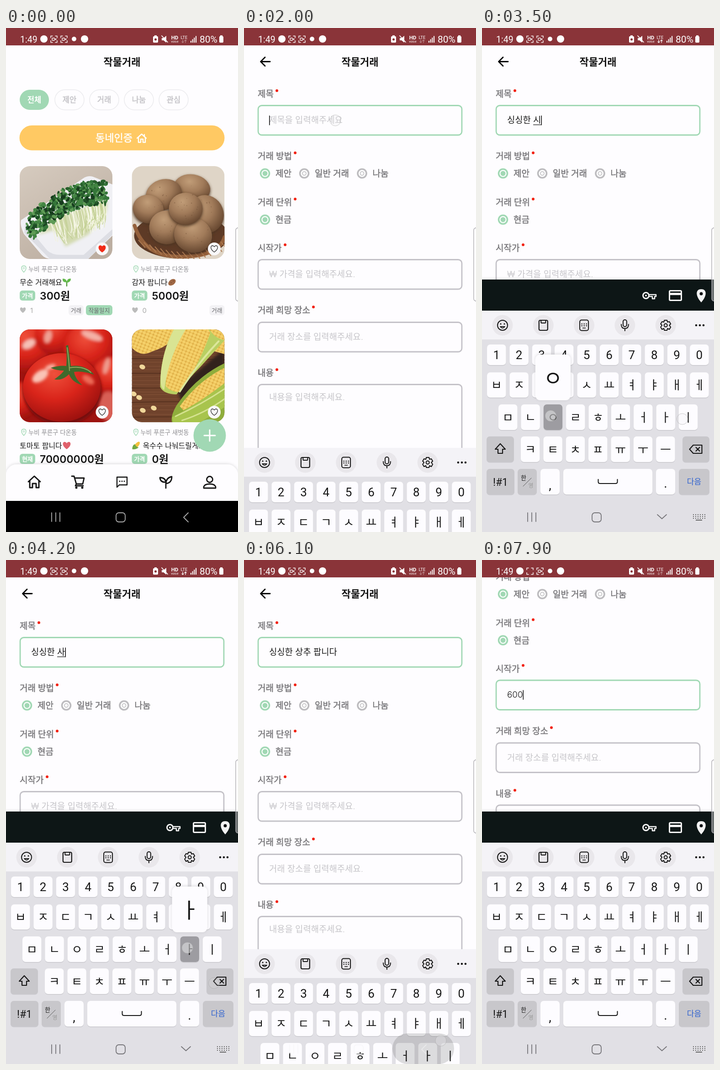
Recreate the animation shown at these times as an HTML page. Size 508 by 1102 pixels, loop 8000 ms.

```html
<!DOCTYPE html>
<html lang="ko">
<head>
<meta charset="utf-8">
<style>
html, body { margin: 0; width: 100%; height: 100%; overflow: hidden; background: #fefdff; }
svg { display: block; width: 100vw; height: 100vh; }
text { font-family: Inter, "Noto Sans CJK KR", "Noto Sans CJK", sans-serif; white-space: pre; }
.latin { font-family: Roboto, sans-serif; }
.price { font-weight: 600; }
.mid { font-weight: 500; stroke-width: .55px; }
.bold { font-weight: 700; }
.light { font-weight: 300; }
.c { text-anchor: middle; }
.line { fill: none; stroke-linecap: round; stroke-linejoin: round; }
</style>
</head>
<body>
<svg id="stage" viewBox="0 0 508 1102" preserveAspectRatio="none"></svg>
<script>
const GREEN = '#a1d8b4', GREY = '#c4c2c8', INK = '#161616';
const HEART = 'M0 7C-10 0-8-7-4-7C-1.5-7 0-5 0-4C0-5 1.5-7 4-7C8-7 10 0 0 7Z';

let seed = 7;
const rand = (a, b) => a + (b - a) * ((seed = seed * 16807 % 2147483647) / 2147483647);
const pick = list => list[rand(0, list.length) | 0];
const repeat = (n, f) => Array.from({ length: n }, (_, i) => f(i)).join('');
const text = (x, y, s, size, fill = INK, cls = '') =>
  `<text x="${x}" y="${y + size * .37}" font-size="${size}" fill="${fill}" class="${cls}"${cls.includes('mid') ? ` stroke="${fill}"` : ''}>${s}</text>`;
const rect = (x, y, w, h, r, fill, more = '') =>
  `<rect x="${x}" y="${y}" width="${w}" height="${h}" rx="${r}" fill="${fill}" ${more}/>`;
const disc = (x, y, r, fill, more = '') => `<circle cx="${x}" cy="${y}" r="${r}" fill="${fill}" ${more}/>`;
const oval = (x, y, rx, ry, fill, turn = 0, more = '') =>
  `<ellipse rx="${rx}" ry="${ry}" fill="${fill}" transform="translate(${x} ${y}) rotate(${turn})" ${more}/>`;
const path = (d, fill, more = '') => `<path d="${d}" fill="${fill}" ${more}/>`;
const line = (d, color, w = 2, more = '') => `<path class="line" d="${d}" stroke="${color}" stroke-width="${w}" ${more}/>`;
const at = (x, y, s) => `<g transform="translate(${x} ${y})">${s}</g>`;
const pin = (x, y) => at(x, y, line('M0 7C-7 0-6-7 0-7C6-7 7 0 0 7Z', GREEN, 1.5) + disc(0, -2, 1.8, 'none', `stroke="${GREEN}"`));
const SOFT = 'filter="url(#soft)"';

// Produce pictures, 203 px square
const sprouts = () => rect(0, 0, 203, 203, 0, 'url(#cloth)') +
  path('M3 118Q0 128 9 148L48 194Q56 203 70 203H150L203 152V40L160 23Q150 20 140 26Z', '#f0f0f4') +
  path('M12 126L60 184Q70 194 90 194H140L203 138V150L150 203H66L10 146Z', '#dddee4') +
  path('M40 150L75 115L190 72Q196 105 172 122L150 150L100 176Q90 150 74 140Z', '#d3dab0', SOFT) +
  repeat(110, () => {
    const k = rand(0, 1), x = 66 + k * 122, y = 116 - k * 38;
    return line(`M${x} ${y}Q${x + 8} ${y + 30} ${x + rand(10, 32) - k * 26} ${y + rand(38, 62) - k * 8}`,
      pick(['#f2f3dd', '#e6ebc6', '#c3d094', '#fafaf0']), 1.6);
  }) +
  repeat(480, () => {
    const k = rand(0, 1), x = 20 + k * 170 + rand(-8, 8), y = 136 - k * 78 - 22 * Math.sin(k * 3.1) + rand(-26, 26);
    return oval(x, y, rand(3, 6.5), rand(2, 4.5), pick(['#285f2c', '#35763a', '#438543', '#1d4b25', '#173c1e', '#5f9b56']), rand(0, 180));
  });

const potatoes = () => rect(0, 0, 203, 203, 0, '#dfd5c7') + oval(108, 152, 103, 50, '#5d3a26') +
  line('M6 130Q28 200 110 198Q190 198 203 155', '#94603b', 8) +
  repeat(16, i => line(`M${15 + i * 12} ${162 + 26 * Math.sin(i / 5)}l14 16`, '#ac7950', 2)) +
  [[132, 48, 40, 30, 10], [70, 62, 40, 33, -18], [36, 94, 34, 31, 20], [162, 105, 39, 42, -20],
   [76, 134, 38, 37, 5], [134, 151, 42, 38, 18], [118, 93, 37, 35, 0]]
    .map(p => oval(p[0], p[1] + 3, p[2], p[3], '#4e3424', p[4], SOFT) + oval(...p.slice(0, 4), 'url(#potato)', p[4])).join('') +
  repeat(60, () => disc(rand(35, 175), rand(40, 165), rand(.5, 1.3), '#76543b', 'opacity=".5"'));

const tomato = () => rect(0, 0, 203, 203, 0, '#9d1310') +
  `<g ${SOFT}>` + [[22, 38, 56], [78, 12, 45], [155, 42, 58], [203, 105, 45], [0, 155, 40]].map(p => disc(...p, 'url(#tomato)')).join('') +
  oval(20, 32, 15, 9, '#f6c0b5', -30) + oval(62, 16, 8, 14, '#f0a093', 15) + oval(158, 14, 24, 8, '#f4b1a6', 20) +
  oval(190, 80, 6, 18, '#ef9c8e', 15) + oval(194, 168, 22, 32, '#d85e54') + '</g>' +
  oval(93, 132, 86, 78, '#750b09', 0, SOFT) + oval(92, 127, 85, 75, 'url(#tomato)') +
  `<g ${SOFT}>` + oval(45, 102, 20, 11, '#fac3b6', -35) + oval(67, 82, 12, 5, '#f9b3a5', -20) + oval(150, 110, 15, 8, '#ed6a56', 35) + '</g>' +
  path('M102 80Q104 54 101 36L106 34Q110 62 112 80Q144 76 163 99Q137 90 119 93Q121 107 137 122Q114 115 108 98Q93 113 76 109Q92 98 97 90Q80 90 68 84Q88 78 102 80Z', '#3f6a2c') +
  line('M104 40Q108 70 109 90M109 84Q140 79 156 94', '#91a65f', 2);

const corn = () => rect(0, 0, 203, 203, 0, '#70432c') +
  repeat(26, i => line(`M0 ${i * 8}q60 ${rand(-5, 5)} 203 ${rand(-3, 3)}`, i % 4 ? '#805036' : '#4c2a1a', 1.3)) +
  path('M98 130L203 42V110L112 166Z', '#30201a', SOFT) +
  path('M0 0H105Q90 34 45 48Q20 62 0 40Z', 'url(#kernels)') +
  path('M168 0H203V54L160 42Z', 'url(#kernels)') +
  path('M92 0Q62 55 62 126Q70 142 98 142Q122 110 150 82L203 24Q180 18 170 0Z', '#b9cf62') +
  path('M108 0Q76 62 74 124Q84 136 102 137Q142 91 172 8L168 0Z', 'url(#kernels)') +
  path('M92 0H118Q80 62 71 132Q60 128 64 91Q70 42 92 0Z', '#d9e493') + line('M190 26Q146 72 105 136', '#dce69b', 4) +
  path('M98 166Q140 104 203 74V203H88Q84 190 98 166Z', '#8fad3c') +
  path('M105 168Q146 112 203 84V118Q154 156 113 177Z', 'url(#kernels)') +
  path('M88 192Q140 166 203 118V170L150 203H90Z', '#a8c44d') + line('M96 190Q154 163 203 130M110 199Q160 183 203 152', '#d5e290', 3) +
  [[23, 82], [16, 149], [24, 177], [48, 172], [4, 141]].map(p => oval(...p, 6.5, 5, '#f0d79a', 20)).join('');

const EMOJI = {
  sprout: line('M0 8V-1', '#539b3d', 2.5) + path('M0 0Q-10 1-9-8Q0-8 0 0ZM0 1Q9 0 9-8Q0-9 0 1Z', '#63b84b'),
  potato: oval(0, 0, 9, 6, '#a06845', -35) + disc(-2, 1, 1, '#6e432c') + disc(3, -3, 1, '#6e432c'),
  heart: path(HEART, '#e0616c', 'transform="scale(1.15)"'),
  corn: oval(1, -1, 4, 9, '#f5c13f', 40) + path('M-9 8Q-9-2-3-3Q-1 3 5 4Q0 9-9 8Z', '#71a943'),
};

function card(x, y, picture, town, title, emoji, ex, label, price, likes, tags) {
  const liked = likes > 0;
  return at(x, y, `<g clip-path="url(#photo)">${picture()}</g>`) +
    disc(x + 180.5, y + 181, 14, '#f9f8fa') +
    at(x + 180.5, y + 181, path(HEART, liked ? '#f12b18' : 'none', `stroke="${liked ? '#f12b18' : '#333'}" stroke-width="1.3"`)) +
    pin(x + 9, y + 225) + text(x + 19, y + 225, town, 13.4, '#8d8c90') +
    text(x + (emoji === 'corn' ? 24 : 0), y + 254, title, 16) + at(x + ex, y + 254, EMOJI[emoji]) +
    rect(x, y + 272, 34, 22, 6, GREEN) + text(x + 17, y + 283, label, 13, '#fff', 'mid c') +
    text(x + 44, y + 283, price, 23, INK, 'price') +
    at(x + 7, y + 315, path(HEART, '#bbb', 'transform="scale(.85)"')) + text(x + 23, y + 315, likes, 15, '#aaa') +
    tags.map(([s, tx, w, bg]) => rect(x + tx, y + 304, w, 22, 6, bg) + text(x + tx + w / 2, y + 315, s, 12.7, '#68686c', 'c')).join('');
}

const ICON = {
  home: line('M-13-1L0-13L13-1M-10-3V12H-4V3H4V12H10V-3', INK, 3),
  cart: line('M-14-13H-9L-4 4H10L13-9H-8M-4 4L-6 8H11', INK, 2.8) + disc(-4, 12, 2.5, INK) + disc(9, 12, 2.5, INK),
  chat: line('M-11 11V-11H11V6H-6Z', INK, 2.4) + [-5, 0, 5].map(x => disc(x, -2, 1.5, INK)).join(''),
  leaf: line('M0 13V-1M0 0Q-12 1-13-10Q-1-10 0 0M0 3Q1-10 13-12Q13 2 0 3', INK, 2.8),
  user: disc(0, -6, 6.5, 'none', `stroke="${INK}" stroke-width="2.8"`) + line('M-13 13V10Q-11 4 0 4Q11 4 13 10V13Z', INK, 2.8),
};

const navIcons = (color, down) =>
  line('M100 1060v19M109 1060v19M118 1060v19', color, 1.8) +
  rect(241, 1060, 20, 20, 6, 'none', `stroke="${color}" stroke-width="1.8"`) +
  line(down ? 'M384 1064l10 9l10-9' : 'M399 1060l-10 10l10 10', color, 1.8);

function listPage() {
  const chips = ['전체', '제안', '거래', '나눔', '관심'], deal = ['거래', 107, 33, '#f3f2f5'];
  const place = '누비 푸른구 ';
  return rect(0, 38, 508, 1000, 0, '#fefdff') + text(254, 74, '작물거래', 22, INK, 'bold c') +
    chips.map((s, i) => {
      const x = i ? 31 + i * 76 : 30;
      return rect(x, 135, 64, 44, 22, i ? '#fefdff' : GREEN, i ? 'stroke="#ebebee" stroke-width="1.5"' : '') +
        text(x + 32, 157, s, 16.5, i ? '#c4c3c7' : '#fff', i ? 'mid c' : 'bold c');
    }).join('') +
    rect(29.5, 213, 449, 54.5, 27, '#ffc963') + text(196, 240, '동네인증', 22, '#fff', 'mid') +
    at(297, 241, line('M-10 0L0-9L10 0M-7-2V9H-2V2H3V9H8V-2M6-8V-5', '#fff', 2.4)) +
    card(30, 302, sprouts, place + '다온동', '무순 거래해요', 'sprout', 103, '가격', '300원', 1, [deal, ['작물일지', 145, 58, GREEN]]) +
    card(275.5, 302, potatoes, place + '다온동', '감자 팝니다', 'potato', 88, '가격', '5000원', 0, [['거래', 170, 33, '#f3f2f5']]) +
    card(30, 659, tomato, place + '다온동', '토마토 팝니다', 'heart', 103, '현재', '70000000원', 0, []) +
    card(275.5, 659, corn, place + '새벗동', '옥수수 나눠드릴게요', 'corn', 10, '가격', '0원', 0, []) +
    disc(446, 891, 35.5, GREEN) + line('M434 891h24M446 879v24', '#fff', 3) +
    rect(0, 954, 508, 110, 24, '#fefdff', 'filter="url(#shade)"') +
    Object.values(ICON).map((s, i) => at(62 + i * 96, 993, s)).join('');
}

const field = (id, y, h, hint) => rect(31, y + 1.5, 446, h - 2.5, 8, '#fefdff', `id="${id}" stroke="${GREY}" stroke-width="2.8"`) +
  (hint ? text(55, y + (h > 80 ? 29 : 33.5), hint, 18.8, '#c6c5c9', 'light') : '');
const label = (y, s, dot) => text(30, y, s, 19, '#7b7a7d', 'mid') + disc(dot, y - 7, 3, '#f22313');
const radio = (x, y, s, on, id = '') => `<g id="${id}">${radioMark(x, y, on)}</g>` + text(x + 23, y, s, 19, '#79787b', 'mid');
const radioMark = (x, y, on) => disc(x, y, 9.5, '#fff', `stroke="${on ? GREEN : '#bdbcbf'}" stroke-width="3.6"`) +
  disc(x, y, on ? 5.5 : 4, on ? GREEN : 'none', on ? '' : 'stroke="#bdbcbf" stroke-width="1.6"');

const formPage = () => rect(0, 38, 508, 1000, 0, '#fefdff') +
  `<g clip-path="url(#body)"><g id="scroll">` +
  line('M57 73.5H37M46 64L36.5 73.5L46 83', '#000', 2.8) + text(254, 74, '작물거래', 22, INK, 'bold c') +
  label(144, '제목', 72) + field('titleBox', 168, 67, '') + '<g id="titleText"></g>' +
  label(280, '거래 방법', 112) + radio(46, 318, '제안', false, 'offer') + radio(132, 318, '일반 거래') + radio(258.5, 318, '나눔') +
  label(381, '거래 단위', 112) + radio(46, 419, '현금', true) +
  label(481, '시작가', 90) + field('priceBox', 505, 67, '') + '<g id="priceText"></g>' +
  label(617, '거래 희망 장소', 152) + field('placeBox', 642, 67, '거래 장소를 입력해주세요.') +
  label(754, '내용', 72) + field('bodyBox', 778, 190, '내용을 입력해주세요.') + '</g></g>' +
  rect(30, 941, 448, 70, 10, GREEN) + text(254, 976.5, '등록하기', 22, '#fff', 'mid c');

// Keyboard
const keys = [];
[['1234567890', 11, 692, 45], ['ㅂㅈㄷㄱㅅㅛㅕㅑㅐㅔ', 11, 753, 55], ['ㅁㄴㅇㄹㅎㅗㅓㅏㅣ', 36, 823, 56], ['ㅋㅌㅊㅍㅠㅜㅡ', 85, 893, 56]]
  .forEach(([row, x, y, h]) => [...row].forEach((c, i) => keys.push({ c, x: x + i * 49.35, y, w: 41.5, h })));
[['⇧', 10, 893, 60, 1], ['⌫', 439, 893, 59, 1], ['!#1', 10, 964, 61, 1], ['한', 78, 964, 42, 1],
 [',', 128, 964, 42], [' ', 178, 964, 195], ['.', 381, 964, 42], ['다음', 431, 964, 67, 1]]
  .forEach(([c, x, y, w, dark]) => keys.push({ c, x, y, w, h: 56, dark }));

const special = {
  '⇧': line('M0-12L11 0H5V9H-5V0H-11Z', INK, 2.2),
  '⌫': line('M-14 0L-6-9H13V9H-6ZM0-4L8 4M8-4L0 4', INK, 2.2),
  '한': text(-8, -9, '한', 13, INK, 'c') + line('M-9 10L9-8', '#555', 1) + text(8, 9, '영', 12, '#999', 'c'),
  ' ': line('M-21-5V0Q-21 4-17 4H17Q21 4 21 0V-5', INK, 2),
  ',': text(0, 7, ',', 28, INK, 'latin c'),
  '.': text(0, 3, '.', 28, INK, 'latin c'),
  '!#1': text(0, 0, '!#1', 23, INK, 'latin c'),
  '다음': text(0, 0, '다음', 17, '#2f62cf', 'c'),
};
const glyph = (c, size) => special[c] || text(0, 0, c, size, INK, /\d/.test(c) ? 'latin c' : 'c');
const keyCap = (k, fill) => rect(k.x, k.y, k.w, k.h, 7, fill || (k.dark ? '#c8c7cb' : '#fdfcff')) +
  at(k.x + k.w / 2, k.y + k.h / 2, glyph(k.c, 26));

const toolIcons = [
  disc(0, 0, 11, 'none', `stroke="${INK}" stroke-width="2"`) + disc(-4, -3, 1.6, INK) + disc(4, -3, 1.6, INK) + line('M-5 3Q0 9 5 3Z', INK, 1.8),
  rect(-9.5, -11, 19, 22, 3, 'none', `stroke="${INK}" stroke-width="2.2"`) + rect(-5, -11, 10, 6, 1, 'none', `stroke="${INK}" stroke-width="2"`),
  rect(-9.5, -11.5, 19, 23, 4, 'none', `stroke="${INK}" stroke-width="2"`) + repeat(6, i => rect(-6 + i % 3 * 5, -4 + (i / 3 | 0) * 4, 2.2, 2.2, 0, INK)) + line('M-3 6H3', INK, 1.6),
  rect(-4, -12, 8, 15, 4, 'none', `stroke="${INK}" stroke-width="2"`) + line('M-8-2Q-8 7 0 7Q8 7 8-2M0 7V12', INK, 2),
  line('M-3-11H3L4-7L8-8L11-3L8 0L11 4L8 9L4 7L3 11H-3L-4 7L-8 9L-11 4L-8 0L-11-3L-8-8L-4-7Z', INK, 2) + disc(0, 0, 3.5, 'none', `stroke="${INK}" stroke-width="2"`),
];
const keyboard = () => rect(0, 618, 508, 500, 0, '#e1e0e5') + rect(0, 618, 508, 63, 0, '#f4f3f7') +
  toolIcons.map((s, i) => disc(45 + i * 89.3, 650, 22.5, '#e9e7eb') + at(45 + i * 89.3, 650, s)).join('') +
  [469, 477, 485].map(x => disc(x, 650, 2.3, INK)).join('') +
  keys.map(k => rect(k.x, k.y + 1.5, k.w, k.h, 7, '#cac9ce') + keyCap(k)).join('') + navIcons('#77767a', true) +
  repeat(18, i => rect(462 + i % 6 * 5, 1063 + (i / 6 | 0) * 4, 2, 2, 0, '#666')) + rect(468, 1075, 14, 2, 0, '#666');

const autofill = () => rect(0, 550, 508, 68.5, 0, '#101214', 'filter="url(#shade)"') +
  disc(359, 585, 6.5, 'none', 'stroke="#f3f3f3" stroke-width="3"') + disc(359, 585, 2, '#f3f3f3') +
  line('M367 583H381V587H378V592H373V587H367', '#f3f3f3', 2.5) +
  rect(410.5, 574.5, 26, 21, 2, 'none', 'stroke="#f3f3f3" stroke-width="3"') + rect(410, 579, 27, 5, 0, '#f3f3f3') +
  path('M480 600C466 584 468 571 480 571C492 571 494 584 480 600Z', '#f3f3f3') + disc(480, 581, 3.5, '#101214');

const camera = (x, id) => at(x, 24.5, line('M-7-3V-7H-3M3-7H7V-3M7 3V7H3M-3 7H-7V3', '#fff', 1.4) +
  `<g id="${id}">${rect(-4, -2.5, 5.5, 5, 1, 'none', 'stroke="#fff" stroke-width="1.3"')}${path('M2 0L5-2.5V2.5Z', '#fff')}</g>`);
const statusBar = () => rect(0, 0, 508, 38, 0, '#8a3439') + text(31, 24.5, '1:49', 19.5, '#fff', 'latin') +
  disc(83, 24, 8, '#fff') + camera(105, 'rec') + camera(127, '') + disc(149, 24, 5, '#fff') + disc(172, 24, 8, '#fff') +
  rect(322, 18, 11, 14, 2, '#fff') + rect(325, 16, 5, 3, 0, '#fff') + disc(327.5, 25, 2.5, '#8a3439') +
  path('M341 22h4l6-5v15l-6-5h-4Z', '#fff') + line('M341 17L354 31', '#fff', 1.8) +
  text(369.5, 21, 'HD', 11.5, '#fff', 'latin bold c') + text(369.5, 29, 'voice', 7, '#fff', 'latin c') +
  text(390, 20, 'LTE', 9.5, '#fff', 'latin c') +
  line('M387 26V32l-2-2M387 32l2-2M393 32V26l-2 2M393 26l2 2', '#fff', 1.3, 'id="data"') +
  repeat(4, i => rect(404 + i * 3.7, 28 - i * 3.5, 2, 4 + i * 3.5, 0, '#fff')) +
  text(424, 24.5, '80%', 21, '#fff', 'latin') + rect(467, 18, 9, 14, 2, '#fff') + rect(469, 16, 5, 3, 0, '#fff');

const stage = document.getElementById('stage');
stage.innerHTML = `<defs>
<clipPath id="photo"><rect width="203" height="203" rx="22"/></clipPath>
<clipPath id="body"><rect y="38" width="508" height="880"/></clipPath>
<linearGradient id="cloth" x2=".6" y2="1"><stop stop-color="#d6cbbf"/><stop offset="1" stop-color="#bcaea1"/></linearGradient>
<radialGradient id="potato" cx=".4" cy=".28" r=".75"><stop stop-color="#c19d78"/><stop offset=".5" stop-color="#a17b5a"/><stop offset="1" stop-color="#65462f"/></radialGradient>
<radialGradient id="tomato" cx=".4" cy=".3" r=".75"><stop stop-color="#ef503b"/><stop offset=".5" stop-color="#d9241a"/><stop offset="1" stop-color="#970f0d"/></radialGradient>
<pattern id="kernels" width="8" height="7" patternUnits="userSpaceOnUse" patternTransform="rotate(22)"><rect width="8" height="7" fill="#dfae45"/><ellipse cx="4" cy="3.5" rx="3.7" ry="3.2" fill="#f5d069"/></pattern>
<filter id="soft"><feGaussianBlur stdDeviation="3"/></filter>
<filter id="shade" x="-10%" y="-20%" width="120%" height="140%"><feDropShadow dx="0" dy="-1" stdDeviation="3" flood-opacity=".14"/></filter>
</defs>
<g id="list">${listPage()}</g><g id="form">${formPage()}</g>
${rect(0, 1034, 508, 68, 0, '#000')}${navIcons('#aaa', false)}
<g id="fill">${autofill()}</g><g id="board">${keyboard()}</g><g id="over"></g>
${rect(503, 437, 20, 160, 5, 'rgba(255,255,255,.4)', 'stroke="#a9a8ad" stroke-width="1.3"')}${statusBar()}`;
const $ = id => document.getElementById(id);

// [time, key, text after the press]
const typing = [
  [2300, 'ㅅ', 'ㅅ'], [2500, 'ㅣ', '시'], [2600, 'ㅇ', '싱'], [2700, 'ㅅ', '싱ㅅ'], [2800, 'ㅣ', '싱시'], [2900, 'ㅇ', '싱싱'],
  [3000, 'ㅎ', '싱싱ㅎ'], [3100, 'ㄴ', '싱싱한'], [3200, ' ', '싱싱한 '], [3300, 'ㅅ', '싱싱한 ㅅ'], [3400, 'ㅣ', '싱싱한 시'],
  [3500, 'ㅇ', '싱싱한 시'], [3600, '', '싱싱한 싱'], [3800, '⌫', '싱싱한 시'], [4000, '⌫', '싱싱한 ㅅ'], [4200, 'ㅏ', '싱싱한 사'],
  [4400, 'ㅇ', '싱싱한 상'], [4500, 'ㅊ', '싱싱한 상ㅊ'], [4700, 'ㅜ', '싱싱한 상추'], [4800, ' ', '싱싱한 상추 '],
  [5200, 'ㅍ', '싱싱한 상추 ㅍ'], [5300, 'ㅏ', '싱싱한 상추 파'], [5400, 'ㅂ', '싱싱한 상추 팝'], [5500, 'ㄴ', '싱싱한 상추 팝ㄴ'],
  [5600, 'ㅣ', '싱싱한 상추 팝니'], [5700, 'ㄷ', '싱싱한 상추 팝니ㄷ'], [5800, 'ㅏ', '싱싱한 상추 팝니다']];
const pricing = [[7300, '6', '6'], [7400, '0', '60'], [7600, '0', '600']];
const presses = [...typing, ...pricing].filter(p => p[1]);
const taps = [[300, 446, 891], [1200, 46, 318], [1800, 200, 202], [6000, 431, 1051], [6400, 200, 538]];
const boardShift = [[0, 484], [2000, 300], [2100, 110], [2200, 0], [6000, 90], [6100, 233], [6200, 484], [6600, 300], [6700, 110], [6800, 0]];
const scrolling = [[0, 0], [6800, 122], [6900, 243.5]];
const latest = (table, t) => table.filter(r => r[0] <= t).pop();

function drawEntry(id, y, value, hint, focused, composing) {
  const g = $(id);
  g.innerHTML = text(55, y, value || hint, 18.8, value ? INK : '#c6c5c9', 'light');
  if (!focused) return;
  const node = g.firstChild, n = value.length;
  const end = 55 + (n ? node.getComputedTextLength() : 0);
  if (composing && n && !value.endsWith(' ')) {
    const w = node.getSubStringLength(n - 1, 1);
    g.innerHTML += rect(end - w, y + 9.5, w, 1.2, 0, INK);
  }
  g.innerHTML += rect(end, y - 10, 1.6, 21, 0, INK);
}

const ring = (x, y, alpha) => disc(x, y, 12, `rgba(235,235,238,${alpha})`, 'stroke="#aaa" stroke-opacity=".6"');

function overlay(t) {
  let s = '';
  if (t === 6000 || t === 6100) s += rect(325, 1035, 135, 67, 33, 'rgba(0,0,0,.13)') + `<g opacity=".55">${navIcons('#f4f4f6', false)}</g>`;
  const recent = presses.filter(p => p[0] <= t && t - p[0] <= 200).slice(-2);
  recent.forEach(([when, c]) => {
    const k = keys.find(k => k.c === c), x = k.x + k.w / 2, y = k.y + k.h / 2;
    if (when < t) { s += ring(x - 13, y + 4, .15); return; }
    s += keyCap(k, '#9d9ca1') + ring(x - 5, y - 3, .5);
    if (!special[c]) s += rect(x - 38.5, k.y - 109, 77, 100, 11, '#fdfcff', 'filter="url(#shade)"') + at(x, k.y - 58, glyph(c, 46));
  });
  taps.filter(p => p[0] <= t && t - p[0] <= 200).forEach(([when, x, y]) => s += ring(x, y, .5 - (t - when) / 700));
  return s;
}

function draw(t) {
  const shift = latest(boardShift, t)[1], price = latest(pricing, t), title = latest(typing, t);
  const onTitle = t >= 1900 && t < 6500, onPrice = t >= 6500;
  $('list').style.display = t < 500 ? '' : 'none';
  $('form').style.display = t < 500 ? 'none' : '';
  $('board').setAttribute('transform', `translate(0 ${shift})`);
  $('fill').style.display = shift ? 'none' : '';
  $('scroll').setAttribute('transform', `translate(0 ${-latest(scrolling, t)[1]})`);
  $('titleBox').setAttribute('stroke', onTitle ? GREEN : GREY);
  $('priceBox').setAttribute('stroke', onPrice ? GREEN : GREY);
  $('offer').innerHTML = radioMark(46, 318, t >= 1300);
  if (t >= 500) {
    drawEntry('titleText', 201.5, title ? title[2] : '', '제목을 입력해주세요', onTitle && t < 5900, true);
    drawEntry('priceText', 538, price ? price[2] : '', '₩ 가격을 입력해주세요.', onPrice, false);
  }
  $('over').innerHTML = overlay(t);
  $('rec').style.display = t % 1400 < 800 ? '' : 'none';
  $('data').style.opacity = (t >= 700 && t < 1500) || (t >= 3300 && t < 5300) ? 1 : .4;
}

let shown = -1;
function tick() {
  const t = Math.floor(performance.now() % 8000 / 100) * 100;
  if (t !== shown) draw(shown = t);
  requestAnimationFrame(tick);
}
tick();
</script>
</body>
</html>
```
